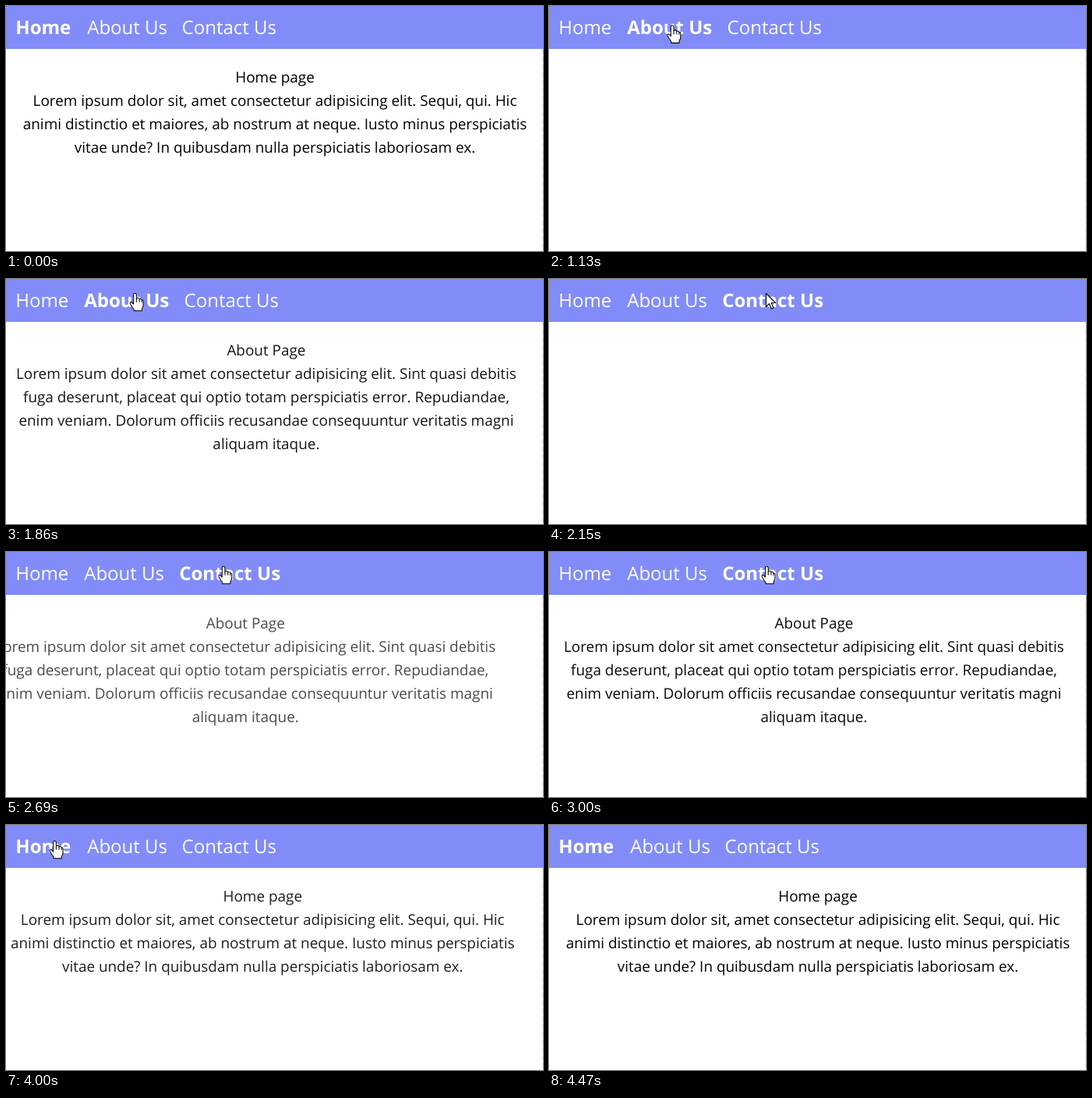
Animation, 689 px wide and 314 px high, one loop 4530 ms. Source, as an HTML page:

```html
<!DOCTYPE html>
<html lang="en">
<head>
<meta charset="utf-8">
<title>Page transitions</title>
<style>
  html, body { margin: 0; width: 100%; height: 100%; overflow: hidden; background: #fff; }
  svg { display: block; width: 689px; height: 314px; }
  text { font-family: "Open Sans", "Noto Sans", sans-serif; text-rendering: geometricPrecision; }
  .nav text { font-size: 24px; fill: #fff; }
  .nav .active { font-weight: 700; }
  .page text { font-size: 18.92px; text-anchor: middle; fill: #000; }
  .cursor path { fill: #fff; stroke: #000; stroke-width: 1.1; stroke-linejoin: round; }
</style>
</head>
<body>
<svg viewBox="0 0 689 314">
  <rect width="689" height="314" fill="#fff"/>
  <path d="M688.5 55V314" stroke="#e6e6e6" stroke-dasharray="6 4"/>
  <g class="page" id="home"></g>
  <g class="page" id="about"></g>
  <rect width="689" height="55" fill="#818cf8"/>
  <g class="nav" id="nav"></g>
  <g class="cursor" id="cursor">
    <path id="arrow" d="M0 0V17L4 13.2L6.8 19.5L9.4 18.4L6.7 12.3L12 12Z"/>
    <g id="hand" transform="scale(.93)">
      <path d="M-2 1.8Q-2 0 0 0Q1.9 0 2 2V7Q3.2 5.8 5 6.6Q5.8 7 6 8Q7.2 7 8.6 8Q9.2 8.4 9.3 9.4Q10.6 8.8 11.4 10.2V16Q11.2 19 9.5 21V24H-1.5V22Q-4 19 -6 15.4Q-7.4 13 -6.4 12Q-5 11.2 -3.5 13L-2 14.8Z"/>
      <path d="M2 7V12M6 8V12M9.3 9.4V12.6" style="fill:none"/>
    </g>
  </g>
</svg>
<script>
const LOOP = 4530, STEP = 59.44, SLIDE = 128, ENTER = 890;
const $ = id => document.getElementById(id);

const pages = {
  home: [
    "Home page",
    "Lorem ipsum dolor sit, amet consectetur adipisicing elit. Sequi, qui. Hic",
    "animi distinctio et maiores, ab nostrum at neque. Iusto minus perspiciatis",
    "vitae unde? In quibusdam nulla perspiciatis laboriosam ex."
  ],
  about: [
    "About Page",
    "Lorem ipsum dolor sit amet consectetur adipisicing elit. Sint quasi debitis",
    "fuga deserunt, placeat qui optio totam perspiciatis error. Repudiandae,",
    "enim veniam. Dolorum officiis recusandae consequuntur veritatis magni",
    "aliquam itaque."
  ]
};

// Each view: click time, start of the entrance, page shown, active link, link positions
const views = [
  { click: -9999, enter: -9999, page: "home", link: 0, xs: [12.3, 104.2, 225.6] },
  { click: 1070, enter: 1280, page: "about", link: 1, xs: [12.3, 100.2, 228.6] },
  { click: 2100, enter: 2316, page: "about", link: 2, xs: [12.3, 100.2, 222.2] },
  { click: 3330, enter: 3471, page: "home", link: 0, xs: [12.3, 104.2, 225.6] }
];

// Pointer path: time, x, y
const path = [
  [310, 284, 238], [790, 157, 36], [960, 157, 36], [1130, 158, 20], [1260, 158, 20],
  [1620, 165, 18], [1960, 165, 18], [2090, 278, 18], [3100, 279, 18], [3310, 62, 20]
];

function addText(parent, str, x, y) {
  const el = document.createElementNS("http://www.w3.org/2000/svg", "text");
  el.setAttribute("x", x);
  el.setAttribute("y", y);
  el.textContent = str;
  parent.appendChild(el);
  return el;
}

for (const id in pages) {
  pages[id].forEach((line, i) => addText($(id), line, 345, 98 + 30 * i));
}
const links = ["Home", "About Us", "Contact Us"].map(s => addText($("nav"), s, 0, 36));

// CSS "ease": cubic-bezier(.25, .1, .25, 1)
function ease(x) {
  if (x <= 0) return 0;
  if (x >= 1) return 1;
  const bez = (a, b, s) => 3 * a * s * (1 - s) ** 2 + 3 * b * s * s * (1 - s) + s ** 3;
  let lo = 0, hi = 1;
  for (let i = 0; i < 24; i++) {
    const mid = (lo + hi) / 2;
    if (bez(.25, .25, mid) < x) lo = mid; else hi = mid;
  }
  return bez(.1, 1, lo);
}

function pointerAt(t) {
  const i = path.findIndex(p => p[0] > t);
  if (i < 0) return path[path.length - 1].slice(1);
  if (i === 0) return path[0].slice(1);
  const [t0, x0, y0] = path[i - 1], [t1, x1, y1] = path[i];
  const k = (t - t0) / (t1 - t0);
  return [x0 + (x1 - x0) * k, y0 + (y1 - y0) * k];
}

const show = (el, on) => el.setAttribute("visibility", on ? "visible" : "hidden");

function draw(time) {
  const t = 1260 + STEP * Math.floor((time - 1250) / STEP);
  const view = views.filter(v => v.click <= t).pop();
  const p = ease((t - view.enter) / ENTER);

  for (const id in pages) {
    const el = $(id);
    el.setAttribute("opacity", id === view.page ? p : 0);
    el.setAttribute("transform", `translate(${(p - 1) * SLIDE} 0)`);
  }
  links.forEach((el, i) => {
    el.setAttribute("x", view.xs[i]);
    el.setAttribute("class", i === view.link ? "active" : "");
  });

  const [x, y] = pointerAt(t);
  const on = t >= 305 && t < 4460;
  const arrow = y > 44 || (t > 2120 && t < 2200);
  $("cursor").setAttribute("transform", `translate(${x + .5} ${y + .5})`);
  show($("arrow"), on && arrow);
  show($("hand"), on && !arrow);
}

const start = performance.now();
function tick() {
  draw((performance.now() - start) % LOOP);
  requestAnimationFrame(tick);
}
tick();
</script>
</body>
</html>
```
